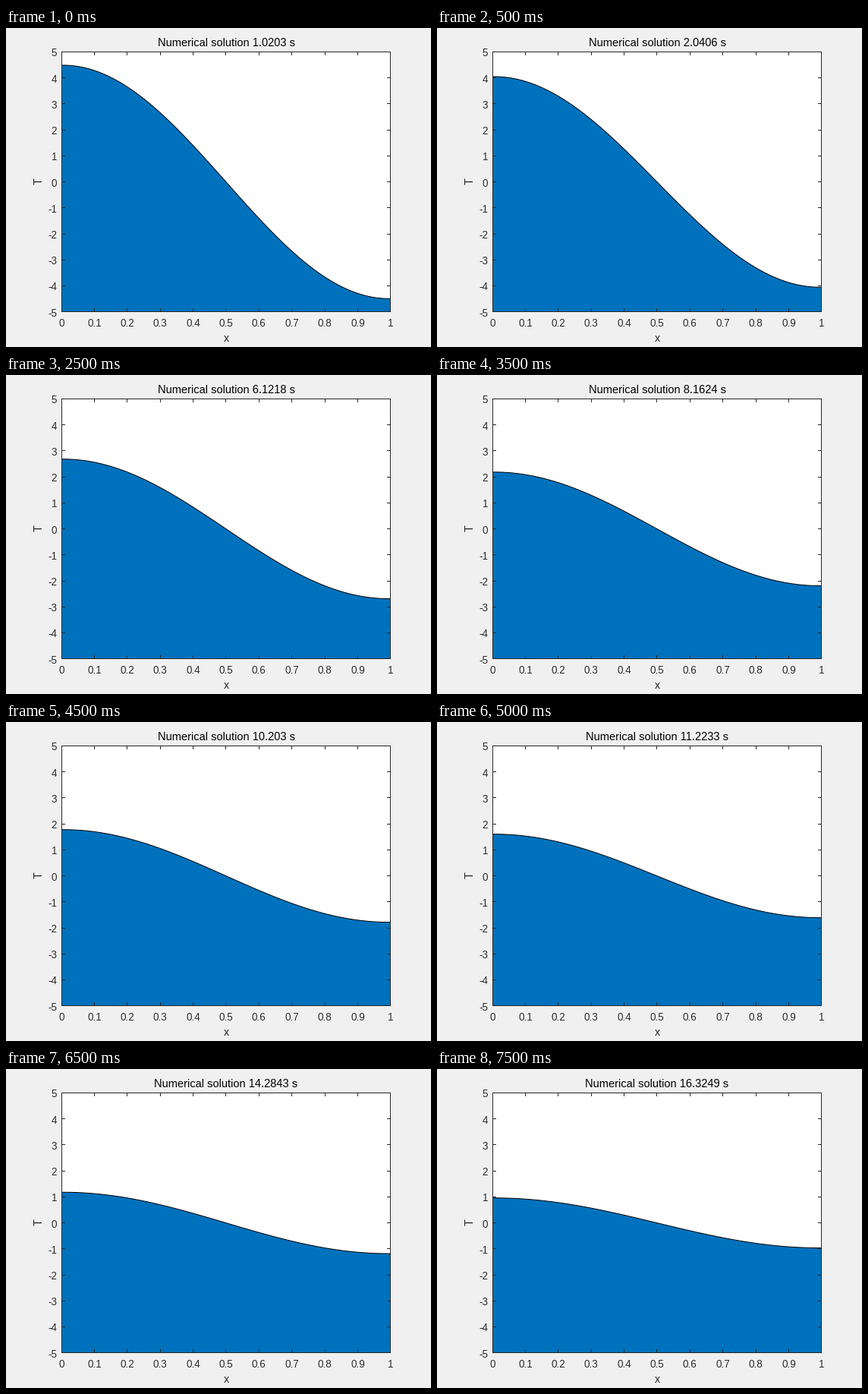
Recreate the animation shown at these times as a matplotlib script. Size 560x420 px, loop 8000 ms.

```python
import numpy as np
import matplotlib.pyplot as plt
from matplotlib.animation import FuncAnimation
from matplotlib.patches import Polygon, Rectangle

W, H, DPI = 560, 420, 100
FRAMES, INTERVAL = 16, 500
LEFT, RIGHT, TOP, BOTTOM = 73.0, 506.8, 31.5, 373.8
PX = 72 / DPI
INK = "#262626"

# Heat conduction on a rod with insulated ends, 100 grid points
N = 100
DT = 1 / 0.99**2
ALPHA = 0.01
AMP = 4.975
RATE = ALPHA * (np.pi * (N - 1) / (N - 2)) ** 2
GRID = np.arange(N)
MODE = np.cos(np.pi * (GRID - 0.5) / (N - 2))

plt.rcParams.update({"font.family": "Liberation Sans", "path.snap": False,
                     "text.hinting": "native"})
fig = plt.figure(figsize=(W / DPI, H / DPI), dpi=DPI, facecolor="#f0f0f0")
ax = fig.add_axes([0, 0, 1, 1])
ax.set_xlim(0, W)
ax.set_ylim(H, 0)
ax.axis("off")


def to_x(v):
    return LEFT + v * (RIGHT - LEFT)


def to_y(v):
    return BOTTOM - (v + 5) / 10 * (BOTTOM - TOP)


def centre(p):
    """Centre of the pixel that holds p."""
    return np.floor(p) + 0.5


def line(x, y):
    ax.plot(x, y, color=INK, lw=PX, zorder=4, solid_capstyle="butt")


def label(x, y, s, size, ha="center", color=INK, **kw):
    return ax.text(x, y, s, fontsize=size * PX, ha=ha, va="baseline",
                   color=color, zorder=5, **kw)


x0, x1, y0, y1 = (centre(p) for p in (LEFT, RIGHT, TOP, BOTTOM))
frame = Rectangle((x0, y0), x1 - x0, y1 - y0, fc="white", ec="none", zorder=0)
ax.add_patch(frame)
area = Polygon([(x0, y1), (x1, y1), (x1, y0)], fc="#0072bd", ec="none", zorder=2)
ax.add_patch(area)
edge, = ax.plot([], [], color="black", lw=PX, zorder=3)
for part in (area, edge):
    part.set_clip_path(frame)

SMALL, LARGE, TICK = 13.333, 14.667, 4.5
for i in range(11):
    x, y = centre(to_x(i / 10)), centre(to_y(i - 5))
    line([x, x], [y1, y1 - TICK])
    line([x, x], [y0, y0 + TICK])
    line([x0, x0 + TICK], [y, y])
    line([x1, x1 - TICK], [y, y])
    label(to_x(i / 10), 393, f"{i / 10:g}", SMALL)
    label(67, np.floor(to_y(i - 5) + 6.4), str(i - 5), SMALL, ha="right")
for y in (y0, y1):
    line([x0 - 0.5, x1 + 0.5], [y, y])
for x in (x0, x1):
    line([x, x], [y0, y1])

label(290, 413, "x", LARGE)
label(48, 202, "T", LARGE, rotation=90, rotation_mode="anchor")
title = label(290, 24, "", LARGE, color="black")


def draw(k):
    t = (k + 1) * DT
    temp = AMP * np.exp(-RATE * t) * MODE
    xs, ys = to_x(GRID / (N - 1)), to_y(temp)
    area.set_xy([(LEFT, BOTTOM), *zip(xs, ys), (RIGHT, BOTTOM)])
    edge.set_data(xs, ys)
    title.set_text(f"Numerical solution {round(t, 4):g} s")
    return area, edge, title


anim = FuncAnimation(fig, draw, frames=FRAMES, interval=INTERVAL,
                     repeat=True, repeat_delay=0)
plt.show()
```
